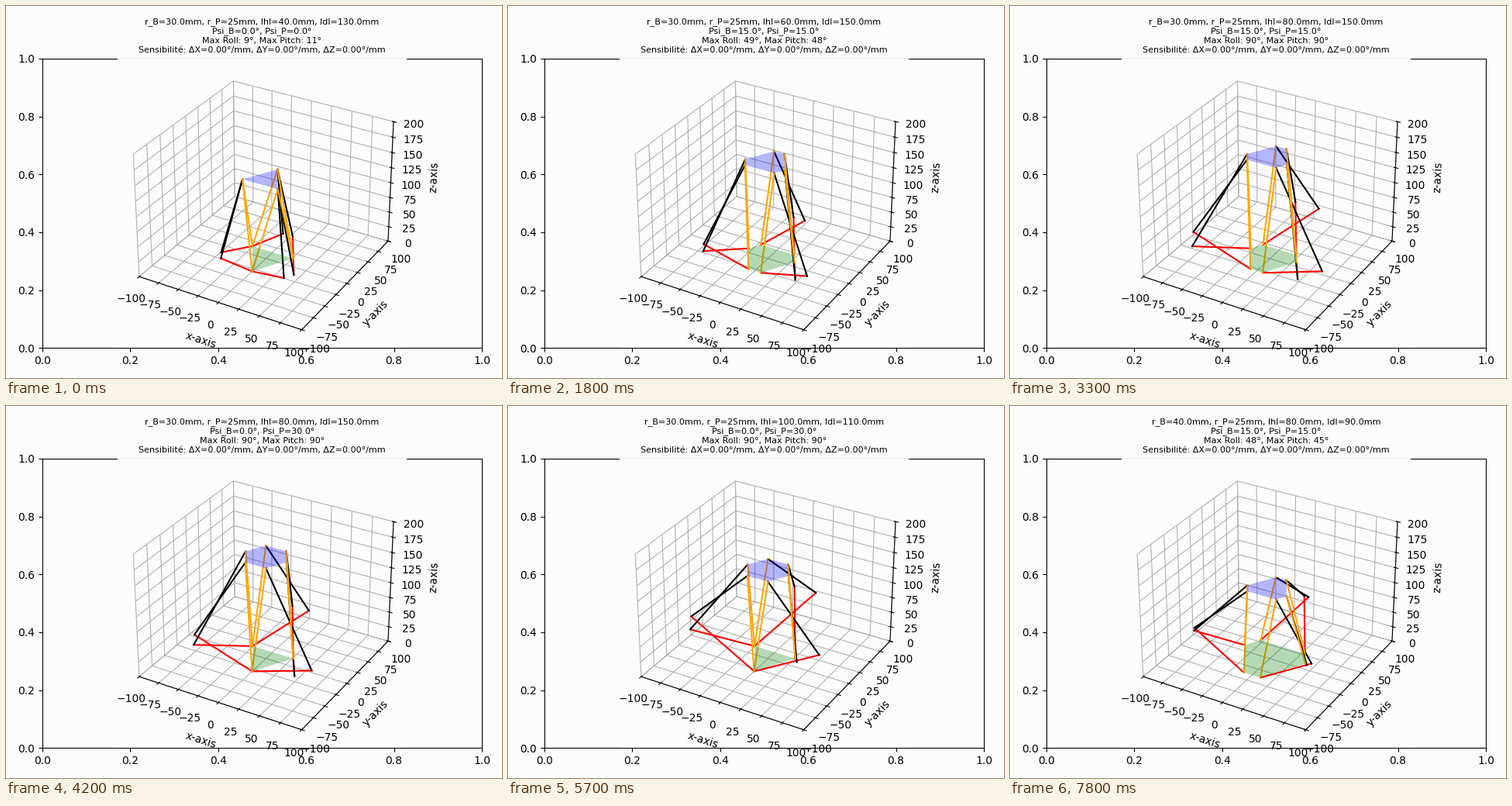
Recreate the animation shown at these times as a matplotlib script. Size 640 by 480 pixels, loop 8000 ms.

```python
import numpy as np
import matplotlib.pyplot as plt
from matplotlib.animation import FuncAnimation
from mpl_toolkits.mplot3d.art3d import Poly3DCollection

PAPER = "#fcfcfc"
R_PLATFORM = 25
LIFT = 30            # height above home at which the tilt limits are tested
HOLD = 3             # ticks of 100 ms per design

# base radius, horn length, rod length
SIZES = [(30, 40, 130), (30, 60, 150), (30, 80, 150),
         (30, 100, 110), (40, 60, 90), (40, 80, 90)]
# half angles between paired joints: base, platform
SPREADS = [(0, 0), (15, 15), (30, 30), (30, 0), (0, 30)]

SIDE = np.array([-1, 1] * 3)
PAIR = np.repeat(np.radians([30, 150, 270]), 2)


def ring(radius, angle):
    return np.array([radius * np.cos(angle), radius * np.sin(angle), 0 * angle])


def rot_x(a):
    c, s = np.cos(a), np.sin(a)
    return np.array([[1, 0, 0], [0, c, -s], [0, s, c]])


def rot_y(a):
    c, s = np.cos(a), np.sin(a)
    return np.array([[c, 0, s], [0, 1, 0], [-s, 0, c]])


class Hexapod:
    def __init__(self, r_base, horn, rod, psi_b, psi_p):
        self.horn, self.rod = horn, rod
        self.base = ring(r_base, PAIR + SIDE * np.radians(psi_b))
        self.plate = ring(R_PLATFORM, PAIR + SIDE * np.radians(60 - psi_p))
        self.beta = PAIR + SIDE * np.pi / 2
        reach = self.plate[:, 0] - self.base[:, 0]
        self.home = np.sqrt(rod**2 + horn**2 - reach @ reach)

    def solve(self, rotation=np.eye(3), lift=0):
        """Platform joints, sine of the horn equation and its phase."""
        top = rotation @ self.plate + [[0], [0], [self.home + lift]]
        leg = top - self.base
        g = (leg**2).sum(axis=0) - self.rod**2 + self.horn**2
        e = 2 * self.horn * leg[2]
        f = 2 * self.horn * (np.cos(self.beta) * leg[0] + np.sin(self.beta) * leg[1])
        return top, g / np.hypot(e, f), np.arctan2(f, e)

    def pose(self):
        top, sine, phase = self.solve()
        alpha = np.arcsin(sine) - phase
        arm = ring(self.horn * np.cos(alpha), self.beta)
        arm[2] = self.horn * np.sin(alpha)
        return top, self.base + arm

    def max_tilt(self, rotate):
        for deg in range(91):
            sine = self.solve(rotate(np.radians(deg)), LIFT)[1]
            if np.any(np.abs(sine) > 1):
                return deg - 1
        return 90


def caption(pod, r_base, horn, rod, psi_b, psi_p):
    return (f"r_B={r_base:.1f}mm, r_P={R_PLATFORM}mm, lhl={horn:.1f}mm, ldl={rod:.1f}mm\n"
            f"Psi_B={psi_b:.1f}°, Psi_P={psi_p:.1f}°\n"
            f"Max Roll: {pod.max_tilt(rot_x)}°, Max Pitch: {pod.max_tilt(rot_y)}°\n"
            "Sensibilité: ΔX=0.00°/mm, ΔY=0.00°/mm, ΔZ=0.00°/mm")


fig = plt.figure(figsize=(6.4, 4.8), dpi=100, facecolor=PAPER)
fig.add_subplot(111, facecolor=PAPER)
ax = fig.add_subplot(111, projection="3d", facecolor=PAPER)
ax.set(xlim=(-100, 100), ylim=(-100, 100), zlim=(0, 200),
       xlabel="x-axis", ylabel="y-axis", zlabel="z-axis")
for axis in (ax.xaxis, ax.yaxis, ax.zaxis):
    axis.set_pane_color(PAPER)

start = [(0, 0, 0), (1, 0, 0), (0, 1, 0)]
floor = ax.add_collection3d(Poly3DCollection([start], facecolors="green", alpha=0.28))
deck = ax.add_collection3d(Poly3DCollection([start], facecolors="blue", alpha=0.28))
floor, deck = ax.collections
horns, rods, legs = [[ax.plot([0, 0], [0, 0], [0, 0], color=color)[0] for _ in range(6)]
                     for color in ("red", "black", "orange")]


def join(lines, a, b):
    for i, line in enumerate(lines):
        line.set_data_3d(*np.column_stack([a[:, i], b[:, i]]))


def update(tick):
    step = tick // HOLD
    design = SIZES[step // 5] + SPREADS[step % 5]
    pod = Hexapod(*design)
    top, tip = pod.pose()
    floor.set_verts([pod.base.T])
    deck.set_verts([top.T])
    join(horns, pod.base, tip)
    join(rods, tip, top)
    join(legs, pod.base, top)
    ax.set_title(caption(pod, *design), fontsize=8)
    return [floor, deck, *horns, *rods, *legs]


update(0)
fig.tight_layout()
anim = FuncAnimation(fig, update, frames=80, interval=100, repeat=True, repeat_delay=0)
plt.show()
```
